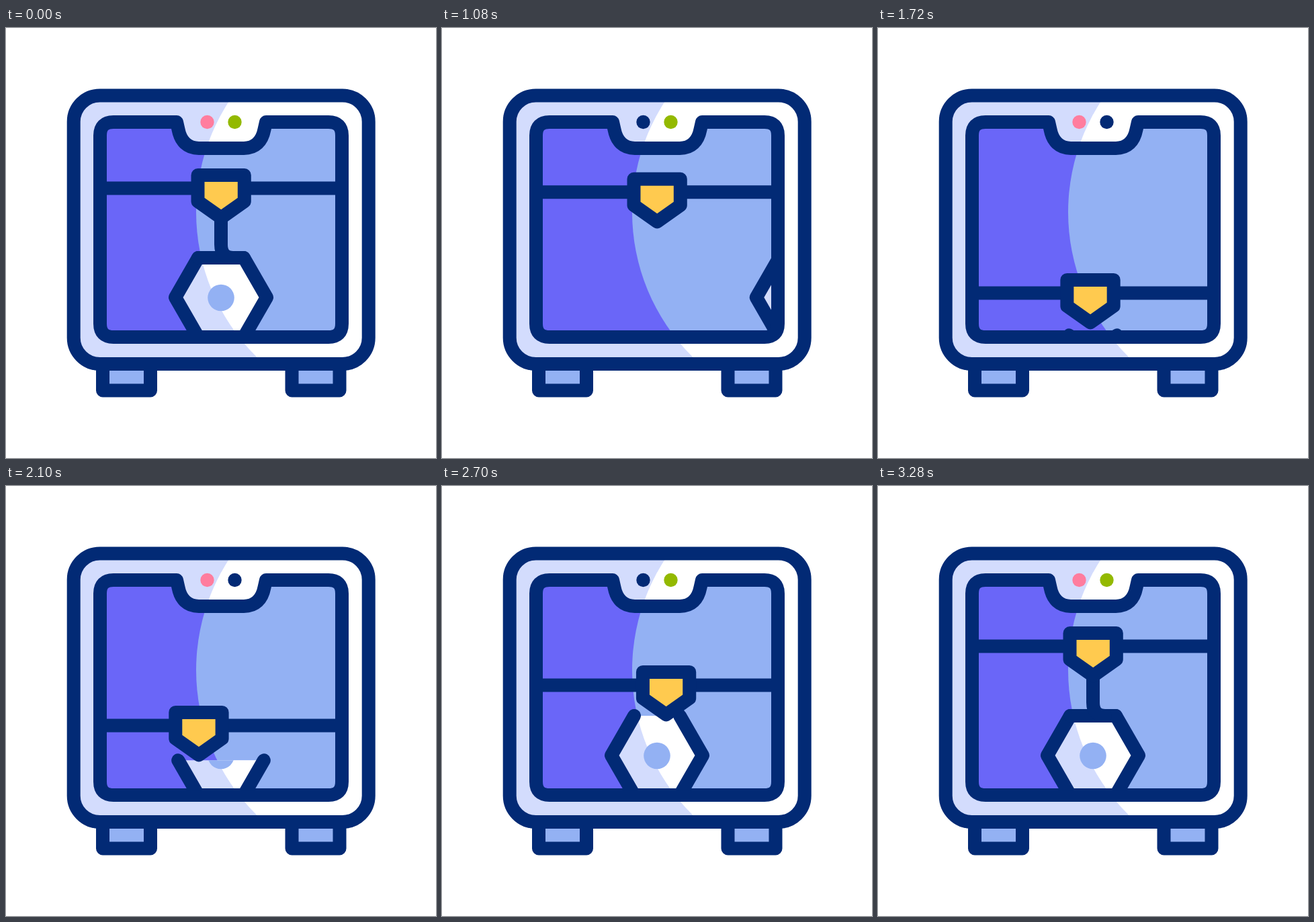
Animation of 640x640 px, one loop 3300 ms. Source, as an HTML page:

```html
<!DOCTYPE html>
<html lang="en">
<head>
<meta charset="utf-8">
<title>3D printer</title>
<style>
  html, body { margin: 0; width: 100%; height: 100%; overflow: hidden; background: #fff; }
  svg { display: block; width: 100vw; height: 100vh; }
  .line { fill: none; stroke: #022a75; stroke-width: 20; stroke-linecap: round; stroke-linejoin: round; }
  .blue { fill: #93b1f3; }
  .pale { fill: #d3dcfd; }
</style>
</head>
<body>
<svg viewBox="0 0 640 640">
  <defs>
    <path id="window" d="M160 140H254L256.500 151C260 169 270 179 287 179H354C371 179 381 169 384.500 151L387 140H480Q500 140 500 160V440Q500 460 480 460H160Q140 460 140 440V160Q140 140 160 140Z"/>
    <rect id="case" x="100.700" y="100.500" width="439" height="399.500" rx="39"/>
    <path id="hex" d="M286 342H354L388 401L354 460H286L252 401Z"/>
    <clipPath id="inWindow"><use href="#window"/></clipPath>
    <clipPath id="inCase"><use href="#case"/></clipPath>
    <clipPath id="inHex"><use href="#hex"/></clipPath>
    <clipPath id="printed"><rect id="level" x="240" y="342" width="160" height="130"/></clipPath>
  </defs>

  <path class="line" style="fill:#93b1f3" d="M144 500V539.500H215V500M425.500 500V539.500H496.500V500"/>
  <g clip-path="url(#inCase)">
    <use href="#case" class="pale"/>
    <circle cx="586" cy="274" r="303" fill="#fff"/>
  </g>
  <g clip-path="url(#inWindow)">
    <use href="#window" fill="#6a66f8"/>
    <circle cx="586" cy="274" r="303" class="blue"/>
    <path id="rail" class="line" d="M140 238.500H500"/>
    <g id="part">
      <g clip-path="url(#printed)">
        <g clip-path="url(#inHex)">
          <use href="#hex" class="pale"/>
          <circle cx="586" cy="274" r="303" fill="#fff"/>
        </g>
        <circle cx="320" cy="401.500" r="19.800" class="blue"/>
      </g>
      <path id="left" class="line" pathLength="1" d="M286 460L252 401L286 342"/>
      <path id="right" class="line" pathLength="1" d="M354 460L388 401L354 342"/>
      <path id="top" class="line" pathLength="1" d="M354 342H286"/>
    </g>
    <path id="filament" class="line" pathLength="1" d="M338 342Q320 342 320 322V276"/>
    <path id="nozzle" class="line" style="fill:#ffca4f" d="M285.500 219H354.800V258L320.200 282.500L285.500 258Z"/>
  </g>
  <use href="#window" class="line"/>
  <use href="#case" class="line"/>
  <circle id="red" cx="299.500" cy="140" r="10.200"/>
  <circle id="green" cx="340.500" cy="140" r="10.200"/>
</svg>
<script>
const LOOP = 3300;
const get = id => document.getElementById(id);
const ramp = (t, a, b) => Math.min(1, Math.max(0, (t - a) / (b - a)));
const ease = u => u * u * (3 - 2 * u);
const move = (id, x, y) => get(id).setAttribute("transform", `translate(${x} ${y})`);

// Show only the first share p of a stroke.
function trim(id, p) {
  const s = get(id).style;
  s.visibility = p > 0 ? "visible" : "hidden";
  s.strokeDasharray = p < 1 ? `${p} 2` : "none";
}

// Sideways nozzle travel: [time, offset]
const sweep = [[1700, 0], [2000, -59], [2460, 58.500], [2960, -35], [3280, 0]];
function sweepX(t) {
  const i = sweep.findIndex(k => t < k[0]);
  if (i < 1) return 0;
  const [a, x] = sweep[i - 1], [b, y] = sweep[i];
  return x + (y - x) * ramp(t, a, b);
}

function draw(t) {
  const printing = t >= 1700;

  const y = printing ? 158 * (1 - ramp(t, 1700, 3280)) : 158 * ease(ramp(t, 1000, 1700));
  move("rail", 0, y);
  move("nozzle", sweepX(t), y);

  // The finished part slides out, then a new one grows.
  move("part", printing ? 0 : 276 * ease(ramp(t, 690, 1250)), 0);
  const sides = printing ? ramp(t, 1700, 2615) : 1;
  const cap = ramp(t, 2800, 3200);
  get("level").setAttribute("y", 460 - 118 * sides);
  trim("left", sides);
  trim("right", sides);
  trim("top", printing ? cap : 1);
  trim("filament", printing ? cap : 1 - ramp(t, 200, 600));

  // Lights go dark in turn, 200 ms each.
  const blink = t >= 1000 && t < 2800 ? Math.floor(t / 200) % 2 : -1;
  get("red").setAttribute("fill", blink === 1 ? "#022a75" : "#ff7d9e");
  get("green").setAttribute("fill", blink === 0 ? "#022a75" : "#93b900");
}

const start = performance.now();
function frame() {
  draw((performance.now() - start) % LOOP);
  requestAnimationFrame(frame);
}
frame();
</script>
</body>
</html>
```
